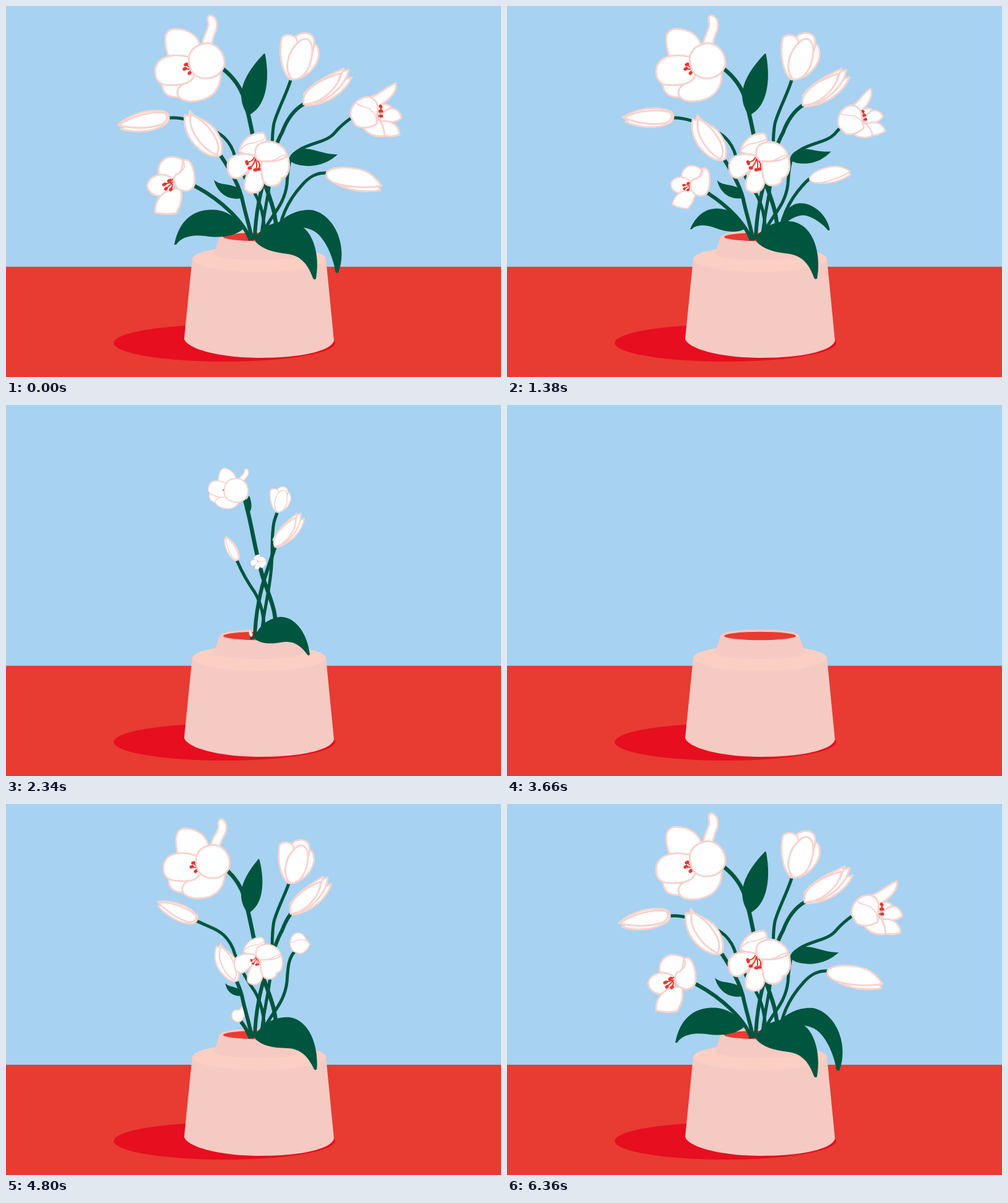
These frames come from a looping animation (800x600 px, 6720 ms). An HTML page without scripts:

```html
<!DOCTYPE html>
<html lang="en">
<head>
<meta charset="utf-8">
<title>Bouquet</title>
<style>
@property --k { syntax: "<number>"; inherits: true; initial-value: 0; }

html, body { margin: 0; width: 100%; height: 100%; overflow: hidden; background: #a7d2f1; }
svg { display: block; width: 800px; height: 600px; animation: wilt 6720ms infinite; }

/* --k counts 60 ms ticks away from full bloom */
@keyframes wilt {
  0% { --k: 0; animation-timing-function: linear; }
  5.357% { --k: 0; animation-timing-function: steps(45); }
  45.536% { --k: 46; animation-timing-function: linear; }
  53.571% { --k: 46; animation-timing-function: steps(46); }
  94.643%, 100% { --k: 0; }
}

/* --a, --b: first and last tick; --m: shrink rate; --r: turn; --o: pivot */
.part {
  --u: clamp(0, (var(--k) - var(--a)) / (var(--b) - var(--a)), 1);
  --g: (var(--u) * var(--u) * var(--u));
  --p: (1 - var(--g));
  --size: scale(max(0, min(1 - var(--m) * var(--g), 4 * var(--p))));
  --turn: calc(var(--u) * var(--u) * var(--r));
}
.stem {
  d: var(--path);
  fill: none;
  stroke: #00553f;
  stroke-width: 6;
  stroke-dasharray: calc(var(--p) * 1px) 2px;
}
.head {
  transform-origin: var(--o);
  transform: var(--size);
  offset-path: var(--path) view-box;
  offset-distance: calc(var(--p) * 100%);
  offset-rotate: var(--turn);
}
.head, .still {
  fill: #fff;
  stroke: #f6d3ce;
  stroke-width: 3;
  stroke-linejoin: round;
}
.leaf, .still {
  transform-origin: var(--o);
  transform: rotate(var(--turn)) var(--size);
}
.leaf { fill: #00553f; }
/* petals and stamens that close behind the front petal */
.fold {
  transform-origin: var(--c);
  transform: scale(max(.2, 1 - 5 * var(--g) * var(--g)));
}
.vein { fill: none; stroke-width: 2; }
.thread, .dot { fill: none; stroke: #e73530; stroke-linecap: round; }
.thread { stroke-width: 2; }
.dot { stroke-width: 5.2; }
</style>
</head>
<body>
<svg viewBox="0 0 800 600">
  <rect width="800" height="600" fill="#a7d2f1"/>
  <rect y="421.7" width="800" height="179" fill="#e83b32"/>

  <!-- vase -->
  <ellipse cx="353" cy="545" rx="179" ry="30" fill="#e60e1f"/>
  <path d="M301 408L288 538C291 553 340 569 412 569S527 556 530 541L517 408z" fill="#f5cac3"/>
  <ellipse cx="409" cy="409" rx="108" ry="21" fill="#fbcfc3"/>
  <path d="M345 373L336 401C346 414 472 414 482 401L472 373C468 360 350 360 345 373z" fill="#f5cac3"/>
  <ellipse cx="409" cy="373.5" rx="58" ry="6.7" fill="#e83b32"/>

  <!-- lower left flower -->
  <g class="part" style="--a:3.6;--b:28.2;--m:.55;--r:40deg;--o:305px 291px;--c:284px 276px;--path:path('M395 379C385 350 350 315 305 291')">
    <path class="stem" pathLength="1"/>
    <g class="head">
      <g class="fold">
        <path d="M247 272C244 256 255 243 269 244C286 245 292 252 288 264L270 282z"/>
        <path d="M268 278C252 268 232 273 228 290C230 304 244 310 256 306L270 294z"/>
        <path d="M264 298C247 304 240 320 241 334C254 337 266 337 275 335C283 322 286 310 282 294z"/>
        <path class="thread" d="M264 283l7-3M256 288l13-3M259 295l9-8M267 297l2-8"/>
        <path class="dot" d="M263 283l2-1M255 289l2-1M258 296l1-1M266 297l1-1"/>
      </g>
      <path d="M286 250C299 243 305 266 305 284C304 298 292 303 279 296C268 286 270 272 279 271C285 267 285 258 286 250z"/>
      <path class="vein" d="M286 250C292 260 286 266 279 271"/>
    </g>
  </g>

  <path class="part leaf" style="--a:3;--b:26;--m:.95;--r:33deg;--o:384px 362px" d="M384 360C365 330 340 327 318 331C290 337 277 360 272 386L275 386C282 374 300 369 322 372C350 376 370 372 384 360z"/>
  <path class="part leaf" style="--a:3;--b:26;--m:1.45;--r:-82deg;--o:442px 350px" d="M438 354C452 337 475 328 495 330C532 338 553 390 537 431Q534 433 532 429C530 410 516 373 496 363C478 355 462 357 438 360z"/>

  <!-- left bud -->
  <g class="part" style="--a:9;--b:40;--m:.95;--r:115deg;--o:263px 181px;--path:path('M418 378C418 340 412 320 402 303C388 283 377 262 370 243C362 215 345 205 330 199C310 190 290 179 263 181')">
    <path class="stem" pathLength="1" style="stroke-width:5"/>
    <g class="head">
      <path d="M181 192L190 185C215 169 240 167 258 171C266 177 264 187 258 191C238 204 210 206 186 199L190 196z"/>
      <path d="M182 193C205 177 236 170 256 173C265 179 258 189 250 192C228 199 205 198 182 193z"/>
    </g>
  </g>

  <!-- right bud -->
  <g class="part" style="--a:4;--b:26.3;--m:1.25;--r:-65deg;--o:517px 270px;--path:path('M440 378C442 340 460 310 478 290C490 276 502 269 518 270')">
    <path class="stem" pathLength="1" style="stroke-width:5"/>
    <g class="head">
      <path d="M518 277C535 294 570 304 604 298L600 290z"/>
      <path d="M518 268C530 258 560 260 580 267C595 274 602 285 606 291C580 296 545 292 530 286C519 281 514 275 518 268z"/>
    </g>
  </g>

  <!-- right flower -->
  <path class="part leaf" style="--a:8;--b:25.7;--m:1;--r:-18deg;--o:458px 247px" d="M457 248C461 232 480 228 498 233C515 238 525 240 536 240C520 255 498 261 480 258C468 257 461 253 457 248z"/>
  <g class="part" style="--a:3.5;--b:33.5;--m:.8;--r:-70deg;--o:558px 181px;--c:586px 174px;--path:path('M414 378C418 345 449 330 454 288C456 260 456 242 477 231C500 219 520 220 533 203C540 195 548 188 558 181')">
    <path class="stem" pathLength="1" style="stroke-width:5"/>
    <g class="head">
      <g class="fold">
        <path d="M598 163C605 157 618 158 622 163L612 176z"/>
        <path d="M604 180C613 162 635 160 639 181C632 188 618 190 606 186z"/>
        <path d="M604 187C620 183 636 192 636 208C622 213 608 211 596 203z"/>
        <path d="M576 195C584 208 598 213 612 210C611 198 609 190 603 184z"/>
        <path d="M580 149C600 148 615 129 630 125C633 137 620 152 606 159L600 180z"/>
        <path class="thread" d="M606 162v8M602 170h6M601 178h6"/>
        <path class="dot" d="M605 162l1 1M605 170h2M606 178h1"/>
      </g>
      <path d="M557 179C555 162 568 148 585 147C598 149 603 160 600 172L599 191C586 198 574 198 565 193z"/>
      <path class="vein" d="M566 157C574 165 586 162 591 170C599 176 599 184 599 191"/>
    </g>
  </g>

  <!-- big flower -->
  <path class="part leaf" style="--a:15.6;--b:35.8;--m:1;--r:-14deg;--o:391px 175px" d="M391 177C374 152 374 122 416 78Q418 75 419 79C427 122 420 165 391 177z"/>
  <g class="part" style="--a:17;--b:45;--m:1.5;--r:60deg;--o:351px 102px;--c:322px 90px;--path:path('M436 378C440 335 425 310 414 275C400 225 397 190 385 150C378 128 366 114 351 102')">
    <path class="stem" pathLength="1" style="stroke-width:6.5"/>
    <g class="head">
      <g class="fold">
        <path d="M262 80C254 56 255 39 271 37C294 36 312 48 315 68L300 90z"/>
        <path d="M317 65C317 47 328 39 327 28C325 20 325 15 331 15C341 18 342 29 340 38C336 48 334 52 332 64z"/>
        <path d="M252 124C252 144 265 149 285 147L300 120z"/>
        <path d="M277 140C277 159 318 159 336 141C347 129 348 114 346 104L304 106C302 124 277 124 277 140z"/>
        <path d="M294 82C274 77 244 79 241 103C240 124 252 129 268 128C290 128 306 122 305 105C305 95 301 86 294 82z"/>
        <path class="thread" d="M291 95l8 6M289 102h11M297 108l5-6"/>
        <path class="dot" d="M290 95l2-1M288 102l2-1M296 109l2-2"/>
      </g>
      <path d="M296 92C292 75 305 62 325 60C345 62 354 80 353 95C348 112 335 118 318 117C303 114 297 104 296 92z"/>
    </g>
  </g>

  <!-- upper tulip -->
  <g class="part" style="--a:16.5;--b:45;--m:2.1;--r:-15deg;--o:460px 120px;--path:path('M412 378C416 335 424 310 428 272C432 240 428 215 433 190C438 170 453 143 460 120')">
    <path class="stem" pathLength="1" style="stroke-width:5"/>
    <g class="head">
      <path d="M474 117C498 108 508 85 505 72C504 64 500 60 497 64L485 95z"/>
      <path d="M466 51C476 41 491 41 497 51C501 65 495 80 485 85z"/>
      <path d="M460 119C445 108 440 74 446 51C452 45 462 46 468 51C476 62 472 100 460 119z"/>
      <path d="M463 119C448 104 454 72 477 55C489 49 496 60 495 75C493 99 482 119 463 119z"/>
    </g>
  </g>

  <!-- slanted tulip -->
  <g class="part" style="--a:8.8;--b:43.8;--m:.7;--r:-30deg;--o:482px 158px;--path:path('M402 378C403 335 412 295 422 268C432 240 436 222 446 205C455 180 468 166 482 158')">
    <path class="stem" pathLength="1"/>
    <g class="head">
      <path d="M484 161C521 160 549 138 559 115L546 119L515 145z"/>
      <path d="M510 140L535 108L554 103C550 126 527 148 500 158z"/>
      <path d="M481 143C496 124 518 113 546 101L538 120z"/>
      <path d="M481 159C476 135 510 118 540 109C540 129 512 158 481 159z"/>
    </g>
  </g>

  <!-- left tulip -->
  <path class="part leaf" style="--a:6.7;--b:33;--m:1;--r:10deg;--o:378px 309px" d="M380 311C358 315 341 301 336 281C346 291 360 286 374 294z"/>
  <g class="part" style="--a:6.7;--b:34;--m:.7;--r:23deg;--o:347px 242px;--path:path('M398 379C392 350 388 340 383 318C378 290 360 262 347 242')">
    <path class="stem" pathLength="1"/>
    <g class="head">
      <path d="M289 176C286 202 298 223 320 237C332 244 342 244 348 240C351 225 347 208 332 193C318 181 302 180 297 169L295 178z"/>
      <path d="M299 175C293 196 312 228 340 241C352 222 326 188 299 175z"/>
    </g>
  </g>

  <!-- centre flower -->
  <g class="part still" style="--a:11;--b:36;--m:1;--r:0deg;--o:408px 254px;--c:406px 250px">
    <path d="M377 235C380 217 395 205 415 205C422 210 421 222 418 230L400 246z"/>
    <path d="M402 242C385 236 359 239 358 258C358 274 365 280 375 278C386 275 392 262 402 260z"/>
    <path d="M400 250C392 270 383 281 386 296C392 304 402 303 408 300C417 295 418 284 417 250z"/>
    <path d="M413 250C411 273 414 290 428 291C439 292 446 284 445 279C458 276 460 258 455 242z"/>
    <path d="M404 245C400 230 405 221 425 219C440 220 455 232 454 243C445 250 430 252 420 251C412 252 406 250 404 245z"/>
    <path class="vein" d="M379 232C390 218 400 225 418 215M420 251C438 252 441 240 454 241"/>
    <g class="fold">
      <path class="thread" d="M390 253C395 252 399 250 401 245M394 262C400 258 402 253 403 247M404 264C406 259 405 253 404 249M409 263C411 258 410 254 407 251"/>
      <path class="dot" d="M389 252l1 3M393 262h2M402 265h2M408 264h1"/>
    </g>
  </g>

  <path class="part leaf" style="--a:15;--b:45;--m:.9;--r:-42deg;--o:404px 376px" d="M403 374C417 353 441 346 463 349C497 357 508 403 501 441Q498 444 496 440C489 420 478 404 455 401C430 398 414 393 403 381z"/>
</svg>
</body>
</html>
```
